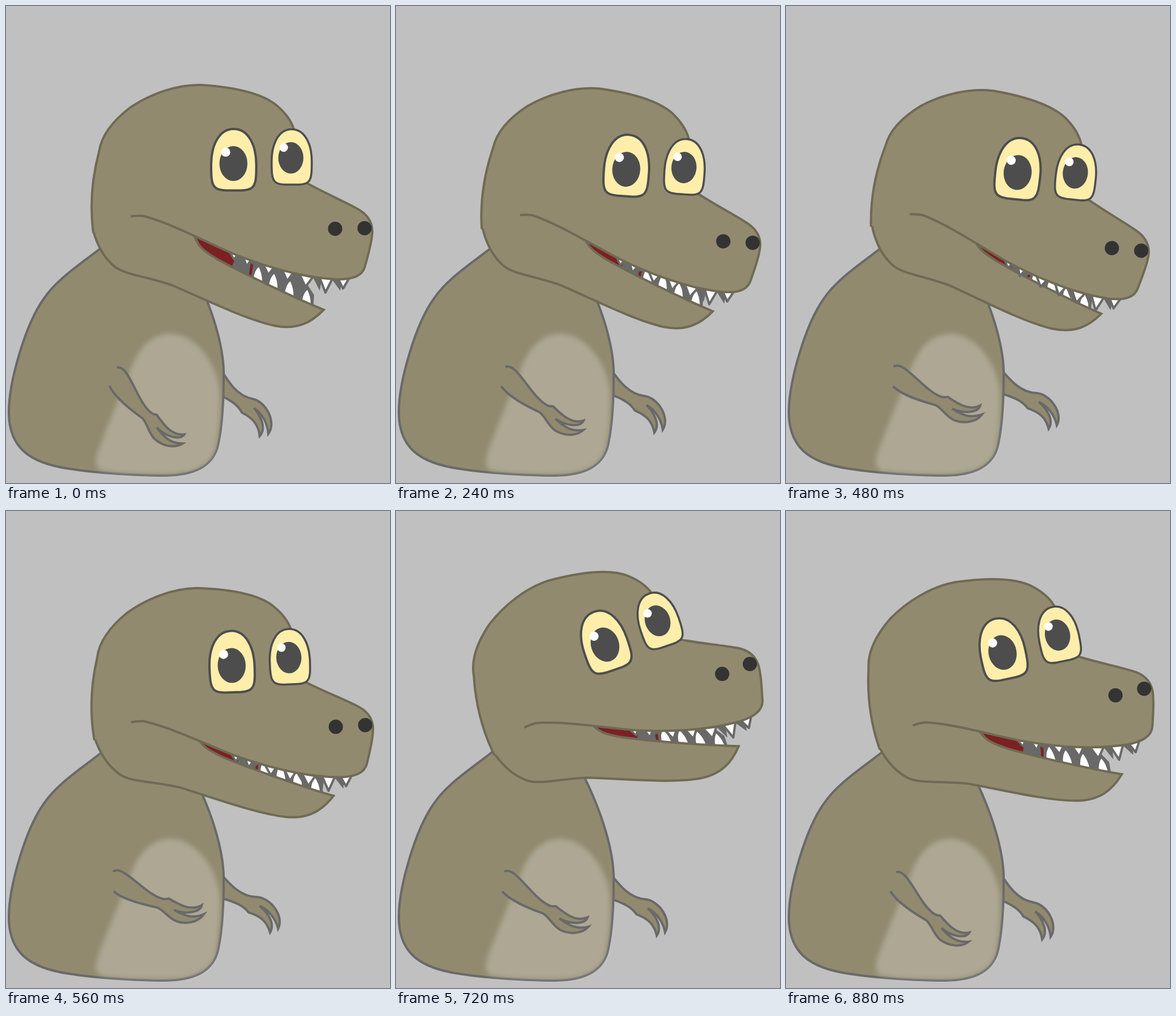
Animation, 672 px wide and 834 px high, one loop 0.96 s. Source, as an HTML page:

```html
<!DOCTYPE html>
<html lang="en">
<head>
<meta charset="utf-8">
<title>Nodding dinosaur</title>
<style>
  html, body { margin: 0; width: 100%; height: 100%; overflow: hidden; background: #c0c0c0; }
  svg { display: block; }
  .skin { fill: #918a6f; stroke: #696969; stroke-width: 4; }
  .face { stroke: #6f6a55; }
  .tooth { fill: #fff; stroke: #696969; stroke-width: 4; }
  .gray { fill: #696969; }
  .eye { fill: #fea; stroke: #4d4d4d; stroke-width: 4; }
  .pupil { fill: #4d4d4d; }
  .nostril { fill: #333; }
</style>
</head>
<body>
<svg width="672" height="834" viewBox="0 0 672 834">
  <defs>
    <filter id="soft" x="-10%" y="-10%" width="120%" height="120%"><feGaussianBlur stdDeviation="4"/></filter>
    <path id="fang" class="tooth" d="M431 478C432 466 436 458 443 453C447 461 451 470 450 486Z"/>
    <path id="socket" d="M398.500 215C425 215 438 245 438 278C438 288 438 296 437 303C435 318 428 322 412 322.500H385C369 322 362 318 360 303C359 296 359 288 359 278C359 245 372 215 398.500 215Z"/>
  </defs>

  <path id="backArm" class="skin" d="M370 625C390 660 405 682 432 687C455 692 474 728 459 748C458 730 448 712 434 703C446 717 456 738 444 752C442 733 433 721 413 711C406 698 395 690 370 678"/>

  <path class="skin" d="M175 416C140 445 90 475 66 512C35 555 5 655 5 710C5 773 42 799 110 809C160 817 230 821 280 821C330 820 360 805 370 772C378 740 381 690 381 640C380 596 364 532 322 450"/>
  <path fill="#fff" fill-opacity=".25" filter="url(#soft)" d="M287 573C330 573 366 620 374 668C377 710 372 750 368 772C360 805 330 818 280 819C230 819 190 818 165 812C150 802 160 780 168 760C185 715 200 680 215 645C228 600 255 573 287 573Z"/>

  <path id="frontArm" class="skin" d="M194 632C216 627 228 692 255 712Q259 714 264 715C276 732 290 752 312 749C304 760 280 753 264 737C275 752 287 765 309 765C293 775 272 768 260 757C249 746 248 731 239 721C217 705 190 684 181 664"/>

  <g id="jaw">
    <path fill="#7d2022" d="M328 395L436 440V476L400 460L345 430Z"/>
    <path class="gray" d="M394 458L404 436L429 444L425 470ZM429 472L434 445L510 468L528 488L539 505L538 526Z"/>
    <use href="#fang"/>
    <use href="#fang" x="27" y="12"/>
    <use href="#fang" x="55" y="25"/>
    <use href="#fang" x="85" y="40"/>
    <path class="skin face" d="M158 379Q150 385 153 394C158 412 168 436 187 453C205 470 245 472 290 488C338 508 418 548 470 559C510 567 535 553 556 531C500 508 420 470 372 444C345 428 336 420 330 403L250 340"/>
  </g>

  <g id="head">
    <path class="gray" d="M388 428L407 436L399 446ZM420 440L446 448L432 453ZM503 466L518 470L514 486ZM536 472L553 474L549 498ZM569 476L588 476L585 498Z"/>
    <path class="tooth" stroke-linejoin="round" d="M415 438L429 444L421 455ZM449 450L469 457L459 470ZM483 460L503 466L492 481ZM514 469L537 474L524 491ZM549 475L571 477L559 501ZM581 477L601 475L590 494Z"/>
    <path fill="#fff" d="M396 434L402 436L399 440Z"/>
    <path class="skin face" d="M153 397L152 390C148 355 148 310 163 254C167 227 185 202 218 177C254 153 300 137 342 138C400 142 450 153 475 175C490 188 499 200 504 216C510 245 515 300 527 310C560 328 590 341 612 353C632 363 641 376 641 394C641 412 633 437 628 456C623 473 605 478 580 478C520 475 460 458 400 434C350 413 290 380 240 367Q229 366 218 368"/>
    <use href="#socket" class="eye"/>
    <ellipse class="pupil" cx="398" cy="275.500" rx="24.500" ry="30.500"/>
    <circle cx="384.500" cy="255.500" r="8" fill="#fff"/>
    <use href="#socket" class="eye" transform="translate(145.300 22) scale(.89 .9)"/>
    <ellipse class="pupil" cx="498.500" cy="265.500" rx="22" ry="27.500"/>
    <circle cx="486" cy="247.500" r="7.500" fill="#fff"/>
    <circle class="nostril" cx="576" cy="389.500" r="12.500"/>
    <circle class="nostril" cx="627.500" cy="388.500" r="12.500"/>
  </g>
</svg>
<script>
  const LOOP = 960, STEP = 80;

  // Keys are [time in ms, angle in degrees].
  const nodKeys = [[0, 0], [465, 7.6], [788, -25.6], [LOOP, 0]];
  const biteKeys = [[0, 0], [160, -2.75], [320, -4.05], [480, -4.7], [LOOP, 0]];
  const armKeys = [[0, 0], [584, -25.2], [LOOP, 0]];

  function angleAt(keys, t) {
    const i = keys.findIndex(key => key[0] > t);
    const [t0, a0] = keys[i - 1], [t1, a1] = keys[i];
    return a0 + (a1 - a0) * (t - t0) / (t1 - t0);
  }

  function turn(id, angle, x, y) {
    document.getElementById(id).setAttribute('transform', `rotate(${angle} ${x} ${y})`);
  }

  function draw() {
    const t = Math.floor(performance.now() % LOOP / STEP) * STEP;
    const nod = angleAt(nodKeys, t), arm = angleAt(armKeys, t);
    turn('head', nod, 254, 353);
    turn('jaw', nod + angleAt(biteKeys, t), 254, 353);
    turn('frontArm', arm, 187, 647);
    turn('backArm', arm * 0.41, 366, 640);
    requestAnimationFrame(draw);
  }
  draw();
</script>
</body>
</html>
```
